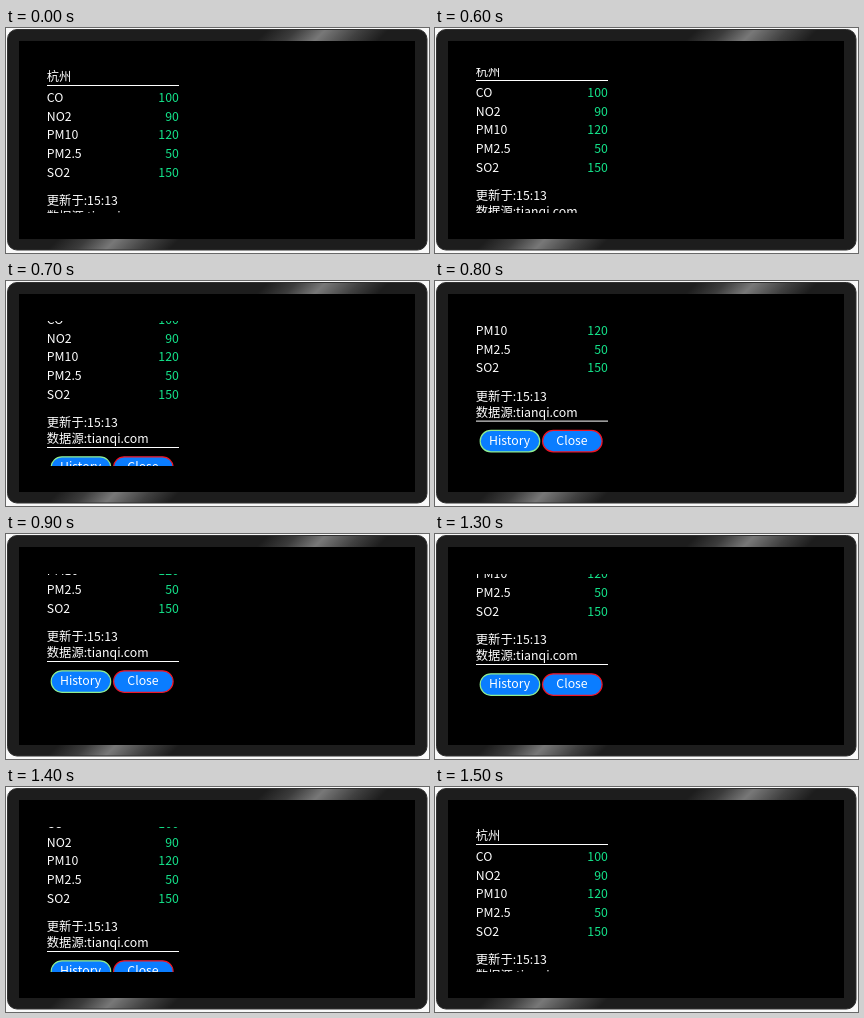
Recreate the animation shown at these times as an HTML page. Size 423 px wide and 225 px high, loop 2300 ms.

```html
<!DOCTYPE html>
<html lang="zh-CN">
<head>
<meta charset="utf-8">
<title>Air quality panel</title>
<style>
  html, body { margin: 0; width: 100%; height: 100%; overflow: hidden; background: #f9f9f9; }
  svg { display: block; width: 423px; height: 225px; }
  text { font: 12.3px "Noto Sans CJK SC", "Noto Sans", sans-serif; fill: #fff; }
  .value { fill: #14e68c; text-anchor: end; }
  .label { text-anchor: middle; }
</style>
</head>
<body>
<svg viewBox="0 0 423 225">
  <defs>
    <linearGradient id="metal" gradientUnits="userSpaceOnUse" x1="52" y1="-48" x2="372" y2="272">
      <stop offset=".405" stop-color="#1d1d1d"/>
      <stop offset=".45" stop-color="#3c3c3c"/>
      <stop offset=".496" stop-color="#787878"/>
      <stop offset=".55" stop-color="#404040"/>
      <stop offset=".595" stop-color="#1d1d1d"/>
    </linearGradient>
    <clipPath id="view"><rect x="39" y="40" width="140" height="145"/></clipPath>
  </defs>
  <rect x="1.5" y="1.5" width="419.5" height="220.5" rx="9.5" fill="url(#metal)" stroke="#303030"/>
  <rect x="13" y="13" width="396" height="198" fill="#000"/>
  <g clip-path="url(#view)"><g id="list"></g></g>
</svg>
<script>
  const list = document.getElementById('list');
  const text = (x, y, s, cls = '') => `<text x="${x}" y="${y}" class="${cls}">${s}</text>`;
  const rule = y => `<rect x="41" y="${y}" width="132" height="1" fill="#fff"/>`;
  const button = (x, s, edge) =>
    `<rect x="${x}" y="206.8" width="59.5" height="21.5" rx="10.75" fill="#0a7dff" stroke="${edge}" stroke-width="1.2"/>` +
    text(x + 29.4, 221, s, 'label');

  const readings = [['CO', 100], ['NO2', 90], ['PM10', 120], ['PM2.5', 50], ['SO2', 150]];
  list.innerHTML =
    text(40.8, 52.8, '杭州') + rule(57) +
    readings.map(([name, value], i) => {
      const y = 74.2 + 18.6 * i;
      return text(40.8, y, name) + text(172.8, y, value, 'value');
    }).join('') +
    text(40.8, 177, '更新于:15:13') +
    text(40.8, 193, '数据源:tianqi.com') + rule(197) +
    button(45.2, 'History', '#90ee90') + button(107.6, 'Close', '#f01424');

  // [start time in ms, scroll offset in px]
  const steps = [[0, 0], [600, 5], [700, 31], [800, 57.4], [900, 70], [1300, 67], [1400, 33], [1500, 0]];

  function draw() {
    const t = performance.now() % 2300;
    const offset = steps.findLast(([start]) => start <= t)[1];
    list.setAttribute('transform', `translate(0 ${-offset})`);
    requestAnimationFrame(draw);
  }
  draw();
</script>
</body>
</html>
```
